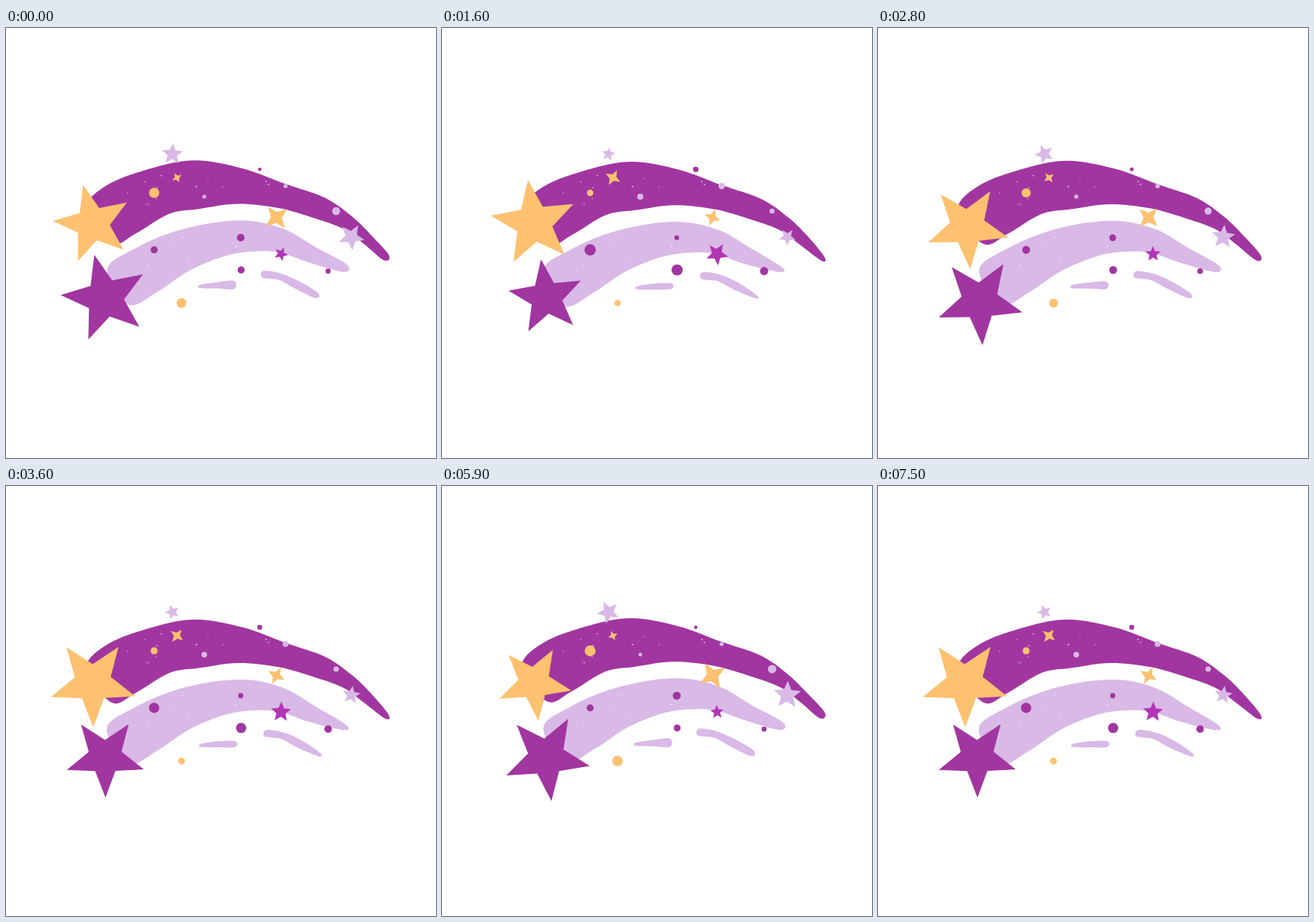
An HTML page with a canvas that plays this animation: 566 px wide and 566 px high, repeating every 7.6 s.

```html
<!DOCTYPE html>
<html lang="en">
<head>
<meta charset="utf-8">
<title>Shooting stars</title>
<style>
html, body { margin: 0; width: 100%; height: 100%; overflow: hidden; background: #fff; }
canvas { display: block; width: 100vw; height: 100vh; }
</style>
</head>
<body>
<canvas id="stage" width="566" height="566"></canvas>
<script>
const ctx = document.getElementById('stage').getContext('2d');
const TAU = Math.PI * 2;
const PLUM = '#a136a1', LILAC = '#d9b9e6', GOLD = '#fdc170', PINK = '#b236b4', PALE = '#f1e4f6';

const STEP = 100, LOOP = 7600, REPEAT = 39;
const SPIN = 38.4, BEAT = 9.6;   // steps per turn and per pulse
const EARLY = 1.2, LATE = 5.4;   // steps at which small parts are largest

// Brush strokes: a spine of [x, y, half width], swaying sideways by drift
const plumTail = { color: PLUM, drift: .5, spine: [
  [122, 262, 28], [153, 239, 37], [205, 215, 32], [252, 207, 32], [309, 209, 23.5],
  [364, 222, 16.5], [414, 238, 15], [450, 257, 10], [476, 279, 7.5], [501, 303, 4]
] };
const lilacTail = { color: LILAC, drift: -.5, spine: [
  [147, 342, 27], [185, 319, 32], [231, 294.5, 27.5], [281, 279, 23], [324, 275, 20],
  [364, 281.5, 15.5], [403, 299.5, 11], [446, 317, 4.5]
] };
const wisps = [
  { color: LILAC, drift: 1, spine: [[256, 341, 2], [278, 339.5, 4], [301, 339, 4.5]] },
  { color: LILAC, drift: 2.5, spine: [[340, 325, 4.5], [362, 328, 4.5], [385, 339, 5.5], [411, 353, 3]] }
];

// x, y, mean radius, colour, peak
const dots = [
  [195, 217, 5.7, GOLD, EARLY], [231, 362, 5.5, GOLD, EARLY],
  [195, 292, 6.2, PLUM, LATE], [309.5, 318.5, 6.1, PLUM, LATE],
  [309, 276, 4.2, PLUM, EARLY], [424, 320, 4.5, PLUM, LATE], [334, 186, 3, PLUM, LATE],
  [434.5, 241, 4.4, LILAC, EARLY], [368, 208, 3.5, LILAC, LATE], [261, 222, 3.3, LILAC, LATE]
];

// as above, then number of points and starting angle in degrees
const sparks = [
  [219, 166, 12.2, LILAC, EARLY, 5, 3], [454.5, 275, 15, LILAC, EARLY, 5, 31],
  [362, 297.5, 12.5, PINK, LATE, 5, 25],
  [225, 197, 9.2, GOLD, LATE, 4, 60], [356, 249.5, 15.2, GOLD, EARLY, 4, 51]
];

const rad = deg => deg * TAU / 360;
const wave = (n, peak) => Math.cos(TAU * (n - peak) / BEAT);
const swell = (n, peak) => 1 + .26 * wave(n, peak);

function seeded(seed) {
  return () => (seed = seed * 16807 % 2147483647) / 2147483647;
}

function disc(x, y, r, color) {
  ctx.fillStyle = color;
  ctx.beginPath();
  ctx.arc(x, y, r, 0, TAU);
  ctx.fill();
}

function star(x, y, r, color, points, inner, angle) {
  ctx.fillStyle = color;
  ctx.beginPath();
  for (let i = 0; i < points * 2; i++) {
    const a = angle + i * Math.PI / points;
    const d = i % 2 ? r * inner : r;
    ctx.lineTo(x + d * Math.sin(a), y - d * Math.cos(a));
  }
  ctx.closePath();
  ctx.fill();
}

// Closed smooth curve through points
function blob(points, color) {
  const at = i => points[(i + points.length) % points.length];
  ctx.fillStyle = color;
  ctx.beginPath();
  ctx.moveTo(...at(0));
  points.forEach((p, i) => {
    const before = at(i - 1), q = at(i + 1), after = at(i + 2);
    ctx.bezierCurveTo(
      p[0] + (q[0] - before[0]) / 6, p[1] + (q[1] - before[1]) / 6,
      q[0] - (after[0] - p[0]) / 6, q[1] - (after[1] - p[1]) / 6, ...q);
  });
  ctx.fill();
}

function ribbon({ color, drift, spine }, sway) {
  const last = spine.length - 1;
  const edge = side => spine.map(([x, y, w], i) => {
    const from = spine[Math.max(i - 1, 0)], to = spine[Math.min(i + 1, last)];
    const a = Math.atan2(to[1] - from[1], to[0] - from[0]);
    const half = side * (i === last ? w - sway : w);
    return [x + drift * sway + half * Math.sin(a), y + sway - half * Math.cos(a)];
  });
  blob([...edge(1), ...edge(-1).reverse()], color);
}

// Fine spatter scattered along a tail
function spatter({ spine }, count, color, seed) {
  const random = seeded(seed);
  for (let i = 0; i < count; i++) {
    const k = 1 + Math.floor(random() * 4), t = random();
    const [x, y, w] = spine[k].map((v, j) => v + (spine[k + 1][j] - v) * t);
    disc(x, y + (random() * 1.6 - .8) * w, .6 + random() * .5, color);
  }
}

// Large star turning about a pivot slightly off its middle
function head(x, y, r, color, turn) {
  const a = turn + 3.28;
  star(x + 3.6 * Math.cos(a), y + 3.6 * Math.sin(a), r, color, 5, .425, turn - rad(14));
}

function draw(n) {
  const turn = TAU * n / SPIN;
  const sway = wave(n, 5.8);
  ctx.fillStyle = '#fff';
  ctx.fillRect(0, 0, 566, 566);

  [plumTail, lilacTail, ...wisps].forEach(s => ribbon(s, sway));
  spatter(plumTail, 13, LILAC, 77);
  spatter(lilacTail, 5, PALE, 23);

  head(117.8, 258.3, 52.8 + 5.5 * wave(n, 7.2), GOLD, turn);
  head(134, 356, 53.3 + 5.5 * wave(n, 0), PLUM, turn);

  for (const [x, y, r, color, peak] of dots)
    disc(x, y, r * swell(n, peak), color);
  for (const [x, y, r, color, peak, points, deg] of sparks)
    star(x, y, r * swell(n, peak), color, points, points === 4 ? .4 : .45, turn + rad(deg));
}

function tick() {
  draw(Math.floor(performance.now() % LOOP / STEP) % REPEAT);
  requestAnimationFrame(tick);
}
tick();
</script>
</body>
</html>
```
